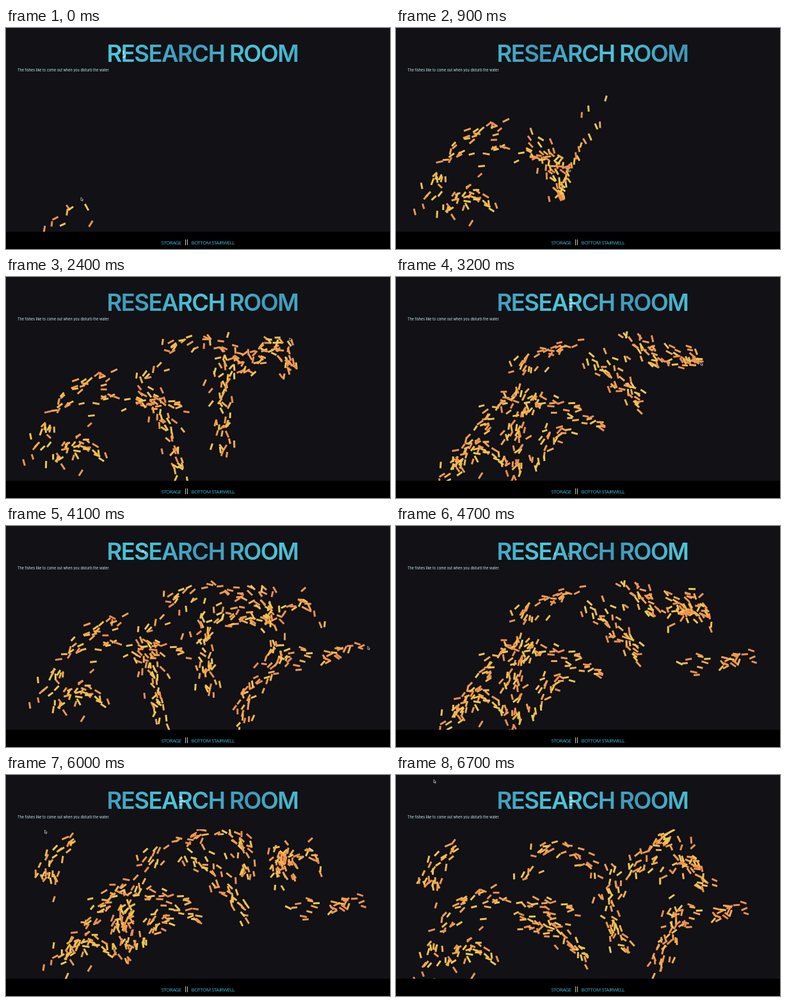
Recreate the animation shown at these times as an HTML page. Size 600 by 346 pixels, loop 6.8 s.

```html
<!DOCTYPE html>
<html lang="en">
<head>
<meta charset="utf-8">
<title>Research Room</title>
<style>
  html, body { margin: 0; width: 100%; height: 100%; overflow: hidden; background: #111116; }
  svg { display: block; width: 600px; height: 346px; }
  .title { font: 600 36.5px Inter, sans-serif; letter-spacing: -1.55px; }
  .note { font: 400 5.5px Inter, sans-serif; fill: #c8edf3; }
  .link { font: 400 8px "Open Sans", "Noto Sans", sans-serif; letter-spacing: -.55px; fill: #3cb4d2; }
</style>
</head>
<body>
<svg viewBox="0 0 600 346">
  <defs>
    <linearGradient id="water" gradientUnits="userSpaceOnUse" x1="0" y1="0" x2="104" y2="30" spreadMethod="reflect">
      <stop offset="0" stop-color="#3f98b8"/>
      <stop offset=".5" stop-color="#44aec8"/>
      <stop offset="1" stop-color="#4cc6d8"/>
    </linearGradient>
    <clipPath id="letters"><text class="title" x="157.5" y="53">RESEARCH ROOM</text></clipPath>
    <clipPath id="tank"><rect y="85" width="600" height="234"/></clipPath>
  </defs>
  <rect width="600" height="346" fill="#111116"/>
  <text class="title" x="157.5" y="53" fill="url(#water)">RESEARCH ROOM</text>
  <g clip-path="url(#letters)">
    <path id="glint" d="M-4-5q8 0 7 4t-6 2M-2 6q8 1 8-5" fill="none" stroke="#b9dfe8" stroke-width="2.4"/>
  </g>
  <text class="note" x="18" y="68">The fishes like to come out when you disturb the water.</text>
  <g id="school" clip-path="url(#tank)"></g>
  <rect y="319" width="600" height="27" fill="#000"/>
  <text class="link" x="242.5" y="338.6">STORAGE</text>
  <path d="M280.6 331v9M283.4 331v9" stroke="#d5e6ea" stroke-width=".9"/>
  <text class="link" x="289.5" y="338.6">BOTTOM STAIRWELL</text>
  <path id="cursor" d="M0 0v5.2l1.2-1 .9 1.9.9-.4-.8-1.8h1.6z" fill="#111" stroke="#eee" stroke-width=".6"/>
</svg>
<script>
const LOOP = 6800, STEP = 100, ORBIT = 1530, TAU = Math.PI * 2;
const COLORS = ["#f6a14f", "#f3c14b", "#ee8d50", "#f5b04d", "#f0984f", "#efc955"];

// Each strand is a quadratic curve; three poses describe one orbit.
const orbiting = [
  { born: -60,  n: 42, poses: ["78 315 115 250 195 175", "50 316 55 225 155 178", "60 275 85 180 190 140"] },
  { born: 300,  n: 56, poses: ["182 312 170 240 205 180", "190 232 260 228 295 285", "205 195 237 210 238 315"] },
  { born: 700,  n: 42, poses: ["205 300 215 205 325 225", "326 168 322 240 365 272", "300 130 300 215 318 255"] },
  { born: 850,  n: 38, poses: ["190 185 205 110 300 95", "195 160 245 75 325 160", "215 165 300 60 400 120"] },
  { born: 950,  n: 46, poses: ["310 120 335 170 385 218", "355 180 385 120 435 97", "320 170 360 115 415 165"] },
  { born: 1900, n: 32, poses: ["358 92 375 110 397 145", "430 95 445 160 495 170", "390 95 425 130 415 215"] },
  { born: 2800, n: 46, poses: ["430 108 450 110 472 138", "440 192 430 250 420 292", "440 180 375 245 372 302"] }
];
const swaying = [
  { born: -90,  n: 34, poses: ["98 303 100 230 160 290"] },
  { born: 450,  n: 30, poses: ["135 205 215 180 290 215"] },
  { born: 3350, n: 20, poses: ["425 165 465 85 490 155"] },
  { born: 3450, n: 28, poses: ["450 215 510 220 550 200"] },
  { born: 4750, n: 32, poses: ["58 185 48 140 105 100"] }
];
const cursorPath = [
  [0, 117, 265], [1600, 388, 184], [2400, 443, 95], [3200, 476, 133], [4100, 565, 188],
  [4800, 220, 18], [5000, 60, 17], [5300, 68, 180], [5700, 62, 165], [6300, 59, 7], [6800, 59, 7]
];

let seed = 11;
const random = () => (seed = (seed * 16807) % 2147483647) / 2147483647;
const scatter = size => (random() + random() + random() - 1.5) * size;
const mix = (a, b, k) => a + (b - a) * k;
const $ = id => document.getElementById(id);

function cursorAt(t) {
  let i = 1;
  while (i < cursorPath.length - 1 && t > cursorPath[i][0]) i++;
  const [t0, x0, y0] = cursorPath[i - 1], [t1, x1, y1] = cursorPath[i];
  const k = Math.max(0, (t - t0) / (t1 - t0));
  return [mix(x0, x1, k), mix(y0, y1, k)];
}

function addFish(strand, u) {
  const node = document.createElementNS("http://www.w3.org/2000/svg", "rect");
  const length = 8.5 + random() * 3;
  const attrs = { x: -length / 2, y: -1.5, width: length, height: 3, fill: COLORS[Math.floor(random() * COLORS.length)] };
  for (const name in attrs) node.setAttribute(name, attrs[name]);
  $("school").append(node);
  const spread = mix(26, 12, u);
  return {
    node, u, poses: strand.poses, born: strand.born + u * 620,
    dx: scatter(spread), dy: scatter(spread), turn: scatter(.8), lag: scatter(.2)
  };
}

const fishes = [...orbiting, ...swaying].flatMap(strand => {
  strand.poses = strand.poses.map(pose => pose.split(" ").map(Number));
  return Array.from({ length: strand.n }, (_, i) => addFish(strand, i / strand.n));
});

function blend(poses, phase) {
  if (poses.length === 1) return poses[0];
  const weights = poses.map((_, i) => (1 + 2 * Math.cos(phase - i * TAU / 3)) / 3);
  return poses[0].map((_, j) => poses.reduce((sum, pose, i) => sum + pose[j] * weights[i], 0));
}

function drawFish(fish, t) {
  const age = t - fish.born;
  fish.node.style.display = age < 0 ? "none" : "";
  if (age < 0) return;
  const phase = TAU * (t / ORBIT - .027) + fish.lag;
  const [x0, y0, x1, y1, x2, y2] = blend(fish.poses, phase);
  const u = fish.u, v = 1 - u;
  const sway = fish.poses.length === 1 ? 8 : 0;
  let x = v * v * x0 + 2 * u * v * x1 + u * u * x2 + fish.dx + sway * Math.cos(phase);
  let y = v * v * y0 + 2 * u * v * y1 + u * u * y2 + fish.dy + sway * Math.sin(phase);
  const angle = Math.atan2(mix(y1 - y0, y2 - y1, u), mix(x1 - x0, x2 - x1, u)) + fish.turn;
  if (age < 300 && fish.born > 0) {
    const [cx, cy] = cursorAt(fish.born), k = Math.sin(age / 300 * TAU / 4);
    x = mix(cx, x, k);
    y = mix(cy, y, k);
  }
  fish.node.setAttribute("transform", `translate(${x.toFixed(2)} ${y.toFixed(2)}) rotate(${(angle * 360 / TAU).toFixed(1)})`);
}

function drawTitle(t) {
  const phase = ((t + 300) % 700) / 700;
  $("water").setAttribute("gradientTransform", `translate(${150 - phase * 208} 26)`);
  $("glint").setAttribute("transform", `translate(${273 - phase * 215} 40)`);
}

function draw(t) {
  drawTitle(t);
  fishes.forEach(fish => drawFish(fish, t));
  $("cursor").setAttribute("transform", `translate(${cursorAt(t)})`);
}

const start = performance.now();
function tick() {
  const t = (performance.now() - start) % LOOP;
  draw(Math.floor(t / STEP) * STEP);
  requestAnimationFrame(tick);
}
draw(0);
requestAnimationFrame(tick);
</script>
</body>
</html>
```
